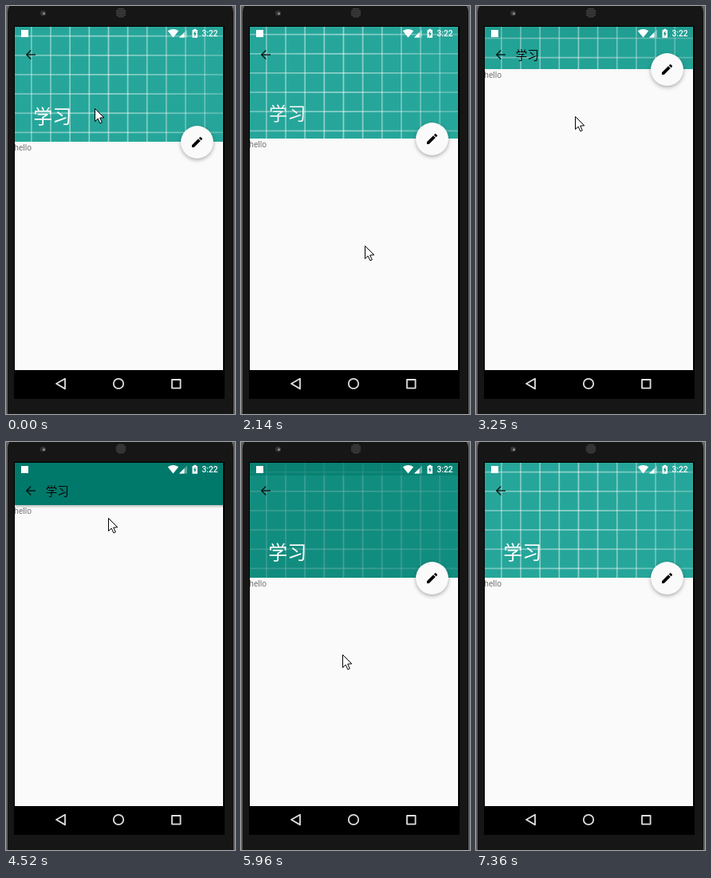
Recreate the animation shown at these times as an HTML page with a canvas. Size 287x511 px, loop 7760 ms.

```html
<!DOCTYPE html>
<html lang="zh">
<head>
<meta charset="utf-8">
<title>Collapsing toolbar</title>
<style>
html, body { margin: 0; width: 100%; height: 100%; overflow: hidden; background: #161616; }
canvas { display: block; width: 287px; height: 511px; }
</style>
</head>
<body>
<canvas id="stage" width="287" height="511"></canvas>
<script>
const ctx = document.getElementById('stage').getContext('2d');
const LOOP = 7760;
const LEFT = 11, RIGHT = 272, TOP = 26, NAV = 456;
const OPEN = 170, CLOSED = 79;
const CJK = '"Noto Sans CJK SC", "Noto Sans CJK", sans-serif';

// Screen refreshes: first time, last time, number of steps.
const refreshes = [
  [0, 0, 1], [130, 1050, 8], [1200, 1590, 4], [1870, 2140, 3], [2290, 2680, 4],
  [2830, 2950, 2], [3100, 3250, 2], [3410, 3680, 3], [3960, 4110, 2],
  [4520, 4520, 1], [4670, 5450, 7], [5580, 5960, 4], [6090, 6240, 2], [6670, 7360, 6]
].flatMap(([a, b, n]) => Array.from({ length: n }, (_, i) => a + (n > 1 ? (b - a) * i / (n - 1) : 0)));

// Tracks: time followed by the values at that time.
const pointer = [
  [0, 111, 128], [130, 106, 122], [390, 90, 165], [660, 130, 265], [920, 168, 353],
  [1050, 167, 343], [1590, 158, 318], [1870, 157, 314], [2140, 155, 300],
  [2680, 139, 226], [2830, 136, 198], [3250, 124, 138], [3680, 123, 128],
  [3960, 127, 89], [4110, 128, 95], [4520, 128, 95], [5450, 127, 195],
  [5960, 127, 266], [6240, 127, 282], [6670, 136, 305], [7222, 229, 495], [7360, 236, 520]
];
const headerEdge = [
  [1740, OPEN], [2140, 166], [2680, 152], [2830, 145], [3100, 120], [3250, CLOSED],
  [4520, CLOSED], [5450, 116], [5580, 130], [5833, OPEN]
];
const scrimFade = [[3200, 0], [3250, 0.08], [3680, 1], [5450, 1], [5960, 0.55], [6240, 0]];
const fabSize = [[3250, 1], [3500, 0], [5450, 0], [5707, 1]];

const lerp = (a, b, k) => a + (b - a) * k;

function sample(track, t) {
  const next = track.findIndex(key => key[0] > t);
  if (next < 0) return track[track.length - 1].slice(1);
  if (next === 0) return track[0].slice(1);
  const a = track[next - 1], b = track[next];
  const k = (t - a[0]) / (b[0] - a[0]);
  return a.slice(1).map((v, i) => lerp(v, b[i + 1], k));
}

function rect(color, x, y, w, h) {
  ctx.fillStyle = color;
  ctx.fillRect(x, y, w, h);
}

function disc(color, x, y, r) {
  ctx.fillStyle = color;
  ctx.beginPath();
  ctx.arc(x, y, r, 0, Math.PI * 2);
  ctx.fill();
}

function poly(points, closed = true) {
  ctx.beginPath();
  points.forEach(([x, y]) => ctx.lineTo(x, y));
  if (closed) ctx.closePath();
}

function text(str, x, y, font, color) {
  ctx.font = font;
  ctx.fillStyle = color;
  ctx.fillText(str, x, y);
}

function drawDevice() {
  rect('#626262', 0, 0, 287, 511);
  ctx.fillStyle = '#161616';
  ctx.beginPath();
  ctx.roundRect(2, -7, 283, 540, 15);
  ctx.fill();
  rect('#000', 10, 25, 264, 467);
  disc('#333', 46.5, 9, 3.6);
  disc('#8a8a8a', 47.5, 9.5, 1.6);
  disc('#222', 144, 8.5, 6.5);
  for (let x = -5; x <= 5; x += 2)
    for (let y = -5; y <= 5; y += 2)
      if (x * x + y * y < 36) rect('#686868', 143.5 + x, 8 + y, 1, 1);
}

function drawNav() {
  ctx.strokeStyle = '#dedede';
  ctx.lineWidth = 1.8;
  ctx.lineJoin = 'round';
  poly([[63, 473], [74, 466.8], [74, 479.4]]);
  ctx.stroke();
  ctx.beginPath();
  ctx.arc(141, 473, 6.2, 0, Math.PI * 2);
  ctx.stroke();
  ctx.strokeRect(208, 468, 10.6, 10.6);
}

function drawHeader(edge, scrim) {
  ctx.save();
  ctx.beginPath();
  ctx.rect(LEFT, TOP, RIGHT - LEFT, edge - TOP);
  ctx.clip();
  rect('#26a69a', LEFT, TOP, RIGHT - LEFT, edge - TOP);
  const shift = (edge - OPEN) / 2;
  const line = ctx.createLinearGradient(LEFT, 0, RIGHT, 0);
  line.addColorStop(0, 'rgba(255,255,255,.36)');
  line.addColorStop(0.45, 'rgba(255,255,255,.5)');
  line.addColorStop(1, 'rgba(255,255,255,.26)');
  for (let i = 0; i < 10; i++) rect(line, 31 + i * 24.15, TOP, 1.7, 150);
  for (let i = 0; i < 6; i++) rect(line, LEFT, 36.8 + i * 24.15 + shift, 261, 1.7);
  ctx.globalAlpha = scrim;
  rect('#00796b', LEFT, TOP, 261, edge - TOP);
  rect('#00796b', LEFT, TOP, 261, 16);
  ctx.restore();
  if (edge < CLOSED + 1 && scrim > 0) {
    const shade = ctx.createLinearGradient(0, edge, 0, edge + 4);
    shade.addColorStop(0, `rgba(0,0,0,${0.24 * scrim})`);
    shade.addColorStop(1, 'rgba(0,0,0,0)');
    rect(shade, LEFT, edge, 261, 4);
  }
}

function drawStatus() {
  rect('#fff', 19, 30, 9, 9);
  ctx.fillStyle = '#fff';
  ctx.beginPath();
  ctx.moveTo(209.5, 39.5);
  ctx.lineTo(202.8, 31.3);
  ctx.quadraticCurveTo(209.5, 26.6, 216.2, 31.3);
  ctx.fill();
  ctx.fillStyle = 'rgba(255,255,255,.35)';
  poly([[217, 39.5], [227, 39.5], [227, 29.5]]);
  ctx.fill();
  ctx.fillStyle = '#fff';
  poly([[217, 39.5], [223.5, 39.5], [223.5, 33]]);
  ctx.fill();
  rect('#fff', 233.5, 30, 6.5, 9.7);
  rect('#fff', 235.3, 28.8, 3, 1.5);
  ctx.fillStyle = '#12897c';
  poly([[237.3, 31], [234.8, 35.3], [236.4, 35.3], [236.3, 38.4], [238.7, 34.2], [237.2, 34.2]]);
  ctx.fill();
  text('3:22', 245.5, 38.3, '500 10.2px Roboto, sans-serif', '#fff');
}

function drawTitle(edge) {
  const closing = (OPEN - edge) / (OPEN - CLOSED);
  const size = lerp(24, 14.5, 1 - (1 - closing) ** 2);
  const tone = Math.round(lerp(255, 8, closing));
  const middle = lerp(138, 61, closing);
  text('学习', lerp(34.3, 49.7, closing), middle + size * 0.38, `${size}px ${CJK}`, `rgb(${tone},${tone},${tone})`);
}

function drawBack() {
  ctx.strokeStyle = 'rgba(0,0,0,.85)';
  ctx.lineWidth = 1.4;
  ctx.lineJoin = 'miter';
  poly([[37, 61], [26, 61]], false);
  ctx.stroke();
  poly([[31.2, 55.6], [25.8, 61], [31.2, 66.4]], false);
  ctx.stroke();
}

const pencil = new Path2D('M3 17.25V21h3.75L17.81 9.94l-3.75-3.75L3 17.25zM20.71 7.04a1 1 0 0 0 0-1.41l-2.34-2.34a1 1 0 0 0-1.41 0l-1.83 1.83 3.75 3.75 1.83-1.83z');

function drawFab(edge, size) {
  if (size <= 0) return;
  ctx.save();
  ctx.translate(239.5, edge + 0.5);
  ctx.scale(size, size);
  ctx.globalAlpha = size;
  ctx.shadowColor = 'rgba(0,0,0,.32)';
  ctx.shadowBlur = 5;
  ctx.shadowOffsetY = 1.8;
  disc('#fafafa', 0, 0, 20.4);
  ctx.shadowColor = 'transparent';
  ctx.scale(0.727, 0.727);
  ctx.translate(-12, -12);
  ctx.fillStyle = '#000';
  ctx.fill(pencil);
  ctx.restore();
}

function drawPointer(x, y) {
  ctx.save();
  ctx.translate(x + 0.5, y + 0.5);
  poly([[0, 0], [0, 16], [3.7, 12.6], [6.4, 18.4], [8.8, 17.3], [6.2, 11.6], [11.3, 11.3]]);
  ctx.fillStyle = '#fff';
  ctx.fill();
  ctx.strokeStyle = '#000';
  ctx.lineWidth = 1;
  ctx.lineJoin = 'miter';
  ctx.stroke();
  ctx.restore();
}

function draw(now) {
  const time = now % LOOP;
  const t = refreshes.filter(r => r <= time).pop();
  const [edge] = sample(headerEdge, t);
  const [scrim] = sample(scrimFade, t);
  const [fab] = sample(fabSize, t);
  const [x, y] = sample(pointer, t);

  drawDevice();
  drawNav();
  ctx.save();
  ctx.beginPath();
  ctx.rect(LEFT, TOP, RIGHT - LEFT, NAV - TOP);
  ctx.clip();
  rect('#fafafa', LEFT, TOP, 261, NAV - TOP);
  text('hello', 10.3, edge + 11.3, '10.2px Roboto, sans-serif', '#757575');
  drawHeader(edge, scrim);
  drawStatus();
  drawBack();
  drawTitle(edge);
  drawFab(edge, fab);
  ctx.restore();
  drawPointer(Math.round(x), Math.round(y));
}

const start = performance.now();
function tick() {
  draw(performance.now() - start);
  requestAnimationFrame(tick);
}
tick();
</script>
</body>
</html>
```
